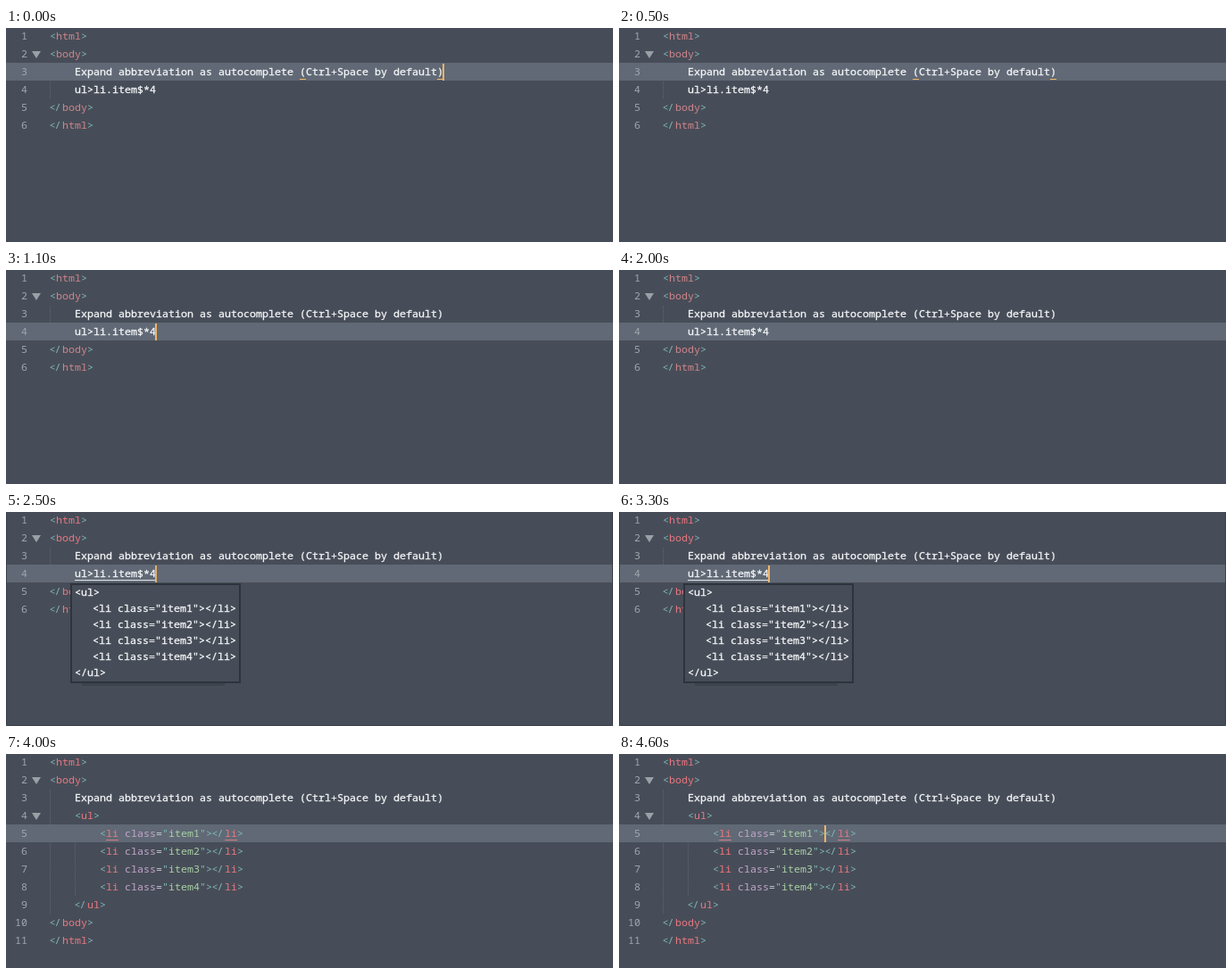
An HTML page with a canvas for the animation above (4700 ms loop, 680 px wide and 240 px high).

```html
<!DOCTYPE html>
<html lang="en">
<head>
<meta charset="utf-8">
<title>Abbreviation autocomplete</title>
<style>
  html, body { margin: 0; width: 100%; height: 100%; overflow: hidden; background: #474d58; }
  canvas { display: block; }
</style>
</head>
<body>
<canvas id="stage" width="680" height="240"></canvas>
<script>
const ctx = document.getElementById('stage').getContext('2d');
const LOOP = 4700, MOVE = 1100, POPUP = 2100, EXPAND = 3400;
const CHAR = 7, LINE = 20, LEFT = 49;
const BG = '#474d58', WHITE = '#f4f6f8', TEAL = '#7fb9b9', ORANGE = '#f2b566';

const hint = '    Expand abbreviation as autocomplete (Ctrl+Space by default)';
const items = [1, 2, 3, 4].map(n => `<li class="item${n}"></li>`);
const before = ['<html>', '<body>', hint, '    ul>li.item$*4', '</body>', '</html>'];
const after = ['<html>', '<body>', hint, '    <ul>',
  ...items.map(s => ' '.repeat(8) + s), '    </ul>', '</body>', '</html>'];

const colX = col => LEFT + col * CHAR;
const rowY = row => row * LINE - 1;

function rect(x, y, w, h, color) {
  ctx.fillStyle = color;
  ctx.fillRect(x, y, w, h);
}

// Fixed-pitch text; heavy adds a hairline for a medium weight.
function text(str, x, y, color, heavy) {
  ctx.fillStyle = ctx.strokeStyle = color;
  ctx.lineWidth = 0.3;
  [...str].forEach((c, i) => {
    ctx.fillText(c, x + i * CHAR, y);
    if (heavy) ctx.strokeText(c, x + i * CHAR, y);
  });
}

function codeLine(str, row, red) {
  const y = rowY(row) + 14;
  if (!str.trim().startsWith('<')) return text(str, LEFT, y, WHITE, true);
  let col = 0, quoted = false;
  for (const token of str.match(/<\/|\w+|./g)) {
    const x = colX(col);
    if (token === '"') quoted = !quoted;
    if (token === '</') {
      text('<', x - 0.5, y, TEAL);
      text('/', x + CHAR - 1.5, y, TEAL);
    } else {
      const color = !/\w/.test(token) ? (token === '=' ? '#c5cdd3' : TEAL)
        : quoted ? '#a9d0a4' : token === 'class' ? '#c3a5cb' : red;
      text(token, x, y, color);
    }
    col += token.length;
  }
}

function guide(col, from, to, active) {
  for (let row = from; row <= to; row++) {
    if (row === active) continue;
    for (let y = rowY(row) + 1; y < rowY(row + 1); y += 2) rect(colX(col), y, 1, 1, '#5f6670');
  }
}

function foldArrow(row) {
  const y = rowY(row) + 7;
  ctx.fillStyle = '#9ba0a7';
  ctx.beginPath();
  ctx.moveTo(29, y);
  ctx.lineTo(39, y);
  ctx.lineTo(34, y + 8);
  ctx.fill();
}

// Smooth caret blink with a one second period.
function blink(ms) {
  const u = ms % 1000;
  const ease = k => (1 - Math.cos(Math.PI * Math.min(1, Math.max(0, k)))) / 2;
  if (u >= 880) return ease((u - 880) / 300);
  if (ms >= 1000 && u < 180) return ease((u + 120) / 300);
  return 1 - ease((u - 350) / 270);
}

function popup() {
  rect(85, 192, 160, 3, '#3d434d');
  rect(72, 80, 191, 112, '#2e333c');
  rect(74, 82, 187, 108, BG);
  ['<ul>', ...items, '</ul>'].forEach((s, i) =>
    text(s, s.startsWith('<li') ? 97 : 77, 94 + i * 18, WHITE, true));
}

function draw(t) {
  const expanded = t >= EXPAND, suggesting = t >= POPUP && !expanded;
  const lines = expanded ? after : before;
  const [row, col, age] = expanded ? [4, 26, t - EXPAND]
    : t >= MOVE ? [3, 17, t - MOVE] : [2, 63, t + 330];

  rect(0, 0, 680, 240, BG);
  rect(0, rowY(row), 680, LINE, '#606975');
  guide(0, 2, expanded ? 8 : 3, row);
  if (expanded) guide(4, 4, 7, row);

  lines.forEach((str, i) => {
    const n = String(i + 1);
    text(n, 24 - n.length * CHAR, rowY(i) + 14, '#a0a6ae');
    codeLine(str, i, t < POPUP ? '#cf858b' : '#ea7780');
  });
  foldArrow(1);
  if (expanded) foldArrow(3);

  const underline = (c, count, y, color) => rect(colX(c), y, count * CHAR, 1, color);
  if (t < MOVE) [40, 62].forEach(c => underline(c, 1, 57, ORANGE));
  if (suggesting) underline(4, 13, 76, '#e3e6ea');
  if (expanded) [9, 28].forEach(c => underline(c, 2, 96, '#d87c85'));

  ctx.globalAlpha = blink(age);
  rect(colX(col) - 1, rowY(row) + 1, 2, 19, ORANGE);
  ctx.globalAlpha = 1;

  if (suggesting) {
    popup();
    ctx.strokeStyle = '#3b414b';
    ctx.lineWidth = 1;
    ctx.beginPath();
    ctx.roundRect(0.5, -4, 679, 243.5, 4);
    ctx.stroke();
  }
}

const start = performance.now();
function frame() {
  ctx.font = '11.667px "Noto Sans Mono", "DejaVu Sans Mono", monospace';
  draw((performance.now() - start) % LOOP);
  requestAnimationFrame(frame);
}
frame();
</script>
</body>
</html>
```
